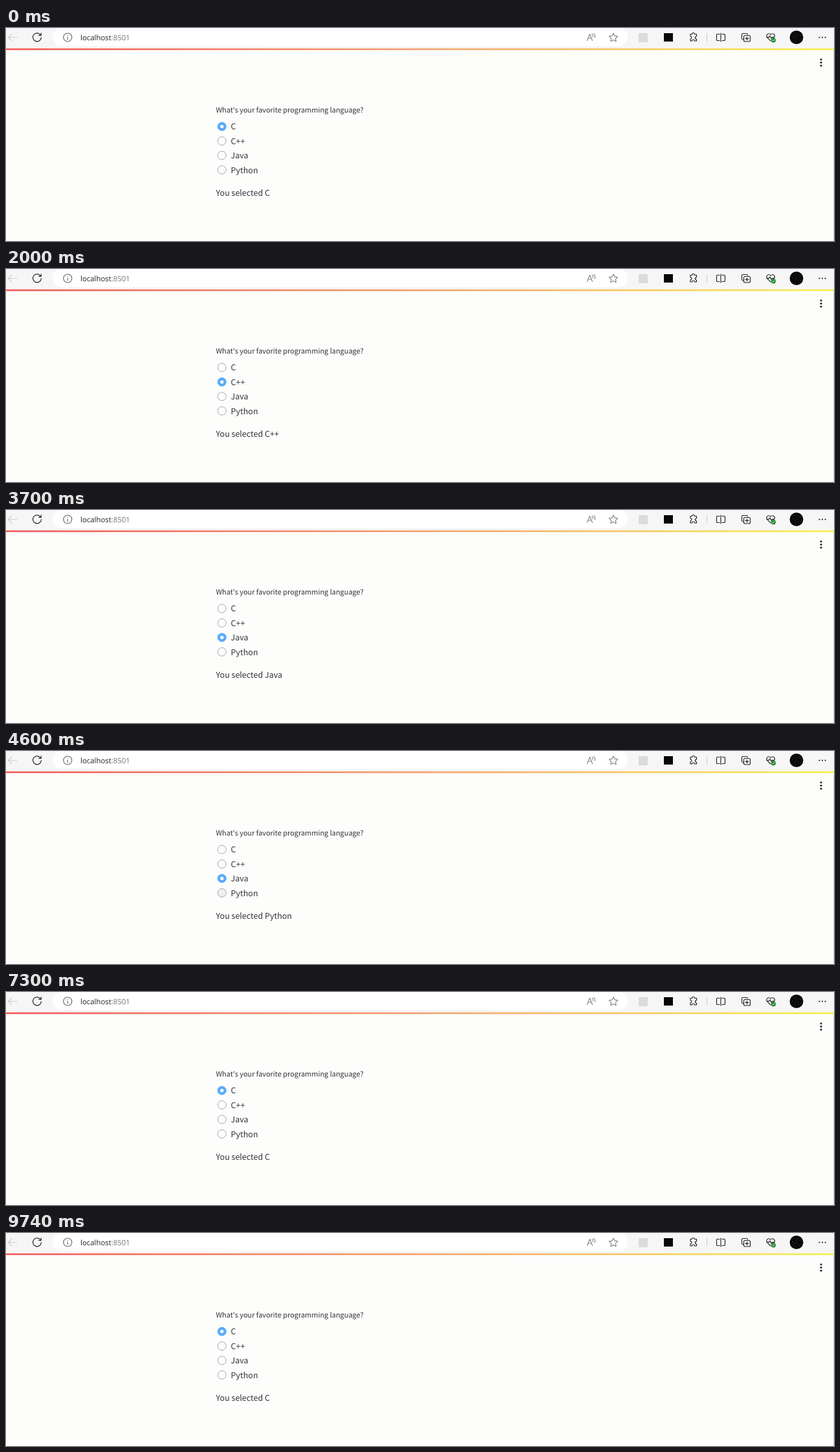
Recreate the animation shown at these times as an HTML page. Size 1280 by 330 pixels, loop 9.78 s.

```html
<!DOCTYPE html>
<html lang="en">
<head>
<meta charset="utf-8">
<title>Favorite language</title>
<style>
  html, body { margin: 0; width: 100%; height: 100%; overflow: hidden; background: #fdfdfc; }
  svg { display: block; width: 1280px; height: 330px; }
  text { text-rendering: geometricPrecision; }
  .page { font-family: "Noto Sans CJK JP", "Noto Sans CJK SC", "Noto Sans", sans-serif; font-size: 12.5px; fill: #31333a; }
  .page .question { font-size: 10.95px; }
  .url { font: 11.4px "Open Sans", "Noto Sans", sans-serif; fill: #242424; }
  .icons { fill: none; stroke: #242424; stroke-width: 1.15; stroke-linecap: round; stroke-linejoin: round; }
  .muted { stroke: #858585; }
  .ring { fill: #fdfdfd; stroke: #a5a7b2; stroke-width: 1; }
  .hover .ring { fill: #eff0f0; }
  .dot { fill: #fff; visibility: hidden; }
  .selected .ring { fill: #58abfb; stroke: #58abfb; }
  .selected .dot { visibility: visible; }
</style>
</head>
<body>
<svg viewBox="0 0 1280 330">
  <defs>
    <linearGradient id="rainbow">
      <stop offset="0" stop-color="#f35757"/>
      <stop offset=".5" stop-color="#f5a06e"/>
      <stop offset="1" stop-color="#f8f04e"/>
    </linearGradient>
  </defs>

  <rect width="1280" height="330" fill="#fdfdfc"/>
  <rect width="1280" height="32" fill="#f6f6f6"/>
  <rect x="72" y="0" width="889" height="28" rx="14" fill="#fff"/>
  <rect y="31.6" width="1280" height="2.6" fill="url(#rainbow)"/>
  <path d="M1279.5 34V330" stroke="#d8d8d8"/>

  <text class="url" x="115" y="18.7">localhost<tspan fill="#777">:8501</tspan></text>

  <g class="icons">
    <path d="M17 14.5H3.500M9 9L3.500 14.500L9 20" stroke="#cfcfcf"/>
    <path d="M53.600 11A6.500 6.500 0 1 0 54.500 14.500M54.300 7.800V11.400H50.700"/>
    <g stroke="#686868">
      <circle cx="95.300" cy="14.500" r="6.500"/>
      <path d="M95.300 14V17.800M95.300 11.300V11.400"/>
    </g>
    <g class="muted">
      <path d="M898.500 19.500L902.500 9.500L906.500 19.500M900 16H905M906 9.500Q908 11.500 907.300 14M908.500 8.300Q911.500 11.500 910.200 15"/>
      <path id="star"/>
    </g>
    <rect x="978" y="8" width="14" height="14" fill="#d9dcda" stroke="none"/>
    <rect x="1017" y="8" width="14" height="13" fill="#080808" stroke="none"/>
    <path d="M1058 9.500H1060.500A2 2 0 1 1 1064.500 9.500H1067.500V12.800A2 2 0 1 0 1067.500 17V20H1064.500A2 2 0 0 0 1060.500 20H1058V16.800A2 2 0 1 0 1058 12.800Z"/>
    <path d="M1083.500 8.500V20.500" stroke="#cfcfcf"/>
    <path d="M1103 9.500H1099.500Q1098.500 9.500 1098.500 10.500V18.500Q1098.500 19.500 1099.500 19.500H1103M1107 9.500H1110.500Q1111.500 9.500 1111.500 10.500V18.500Q1111.500 19.500 1110.500 19.500H1107M1105 8V21"/>
    <path d="M1140 17.500H1139Q1137.500 17.500 1137.500 16V10Q1137.500 8.500 1139 8.500H1145Q1146.500 8.500 1146.500 10"/>
    <rect x="1140.500" y="11.500" width="10" height="9.500" rx="2"/>
    <path d="M1145.500 13.800V18.800M1143 16.300H1148"/>
    <path d="M1182 20L1177.200 15.200Q1174.500 12 1177 9.600Q1179.700 7.600 1182 10.200Q1184.500 7.600 1187 9.600Q1189.300 11.600 1187.800 14M1176 14.300H1179.500L1181 12L1183 16L1184.300 14.300H1187.500"/>
    <circle cx="1186.300" cy="18.800" r="3.700" fill="#238a32" stroke="none"/>
    <path d="M1184.500 18.900L1185.800 20.100L1188.100 17.700" stroke="#fff" stroke-width=".9"/>
  </g>
  <g id="avatar"><circle cx="1222" cy="14.500" r="10.500" fill="#080a0a"/></g>
  <g id="menus" fill="#242424"></g>

  <g class="page">
    <text class="question" x="324.500" y="130.700">What's your favorite programming language?</text>
    <g id="options"></g>
    <text id="answer" x="324.500" y="260"></text>
  </g>
</svg>
<script>
const LOOP = 9780;
const languages = ["C", "C++", "Java", "Python"];
// Each track holds [start in ms, language index]; -1 means none.
const selectedTrack = [[0, 0], [1900, 1], [3670, 2], [4770, 3], [7040, 0]];
const answerTrack = [[0, 0], [1940, 1], [3460, 2], [4560, 3], [7080, 0]];
const hoverTrack = [[0, -1], [1300, 1], [1900, -1], [2700, 2], [3670, -1], [4470, 3], [4770, -1], [6540, 0], [7040, -1]];

const byId = id => document.getElementById(id);

function add(parent, tag, attributes) {
  const node = document.createElementNS("http://www.w3.org/2000/svg", tag);
  for (const [name, value] of Object.entries(attributes)) node.setAttribute(name, value);
  return parent.appendChild(node);
}

const starPoints = Array.from({ length: 10 }, (_, i) => {
  const radius = i % 2 ? 3.5 : 7, angle = i * Math.PI / 5 - Math.PI / 2;
  return `${939 + radius * Math.cos(angle)} ${15 + radius * Math.sin(angle)}`;
});
byId("star").setAttribute("d", `M${starPoints.join("L")}Z`);

for (let i = 0; i < 9; i++) {
  const angle = i * 2.4, radius = 2.8 * Math.sqrt(i);
  add(byId("avatar"), "circle", {
    cx: 1222 + radius * Math.cos(angle), cy: 14.5 + radius * Math.sin(angle),
    r: 0.5, fill: i % 2 ? "#47634f" : "#69605a"
  });
}

for (const i of [-1, 0, 1]) {
  add(byId("menus"), "circle", { cx: 1262 + 4.6 * i, cy: 14.6, r: 1.1 });
  add(byId("menus"), "circle", { cx: 1260, cy: 53.5 + 4.7 * i, r: 1.55 });
}

const options = languages.map((language, i) => {
  const y = 152.6 + 22.4 * i;
  const option = add(byId("options"), "g", {});
  add(option, "circle", { class: "ring", cx: 333.8, cy: y, r: 6.5 });
  add(option, "circle", { class: "dot", cx: 333.8, cy: y, r: 2.6 });
  add(option, "text", { x: 347.6, y: y + 4.8 }).textContent = language;
  return option;
});

const valueAt = (track, time) => track.findLast(([start]) => start <= time)[1];

function render(now) {
  const time = Math.max(0, now) % LOOP;
  const selected = valueAt(selectedTrack, time);
  const hovered = valueAt(hoverTrack, time);
  options.forEach((option, i) => {
    option.setAttribute("class", i === selected ? "selected" : i === hovered ? "hover" : "");
  });
  byId("answer").textContent = `You selected ${languages[valueAt(answerTrack, time)]}`;
}

const startTime = performance.now();
function tick() {
  render(performance.now() - startTime);
  requestAnimationFrame(tick);
}
tick();
</script>
</body>
</html>
```
